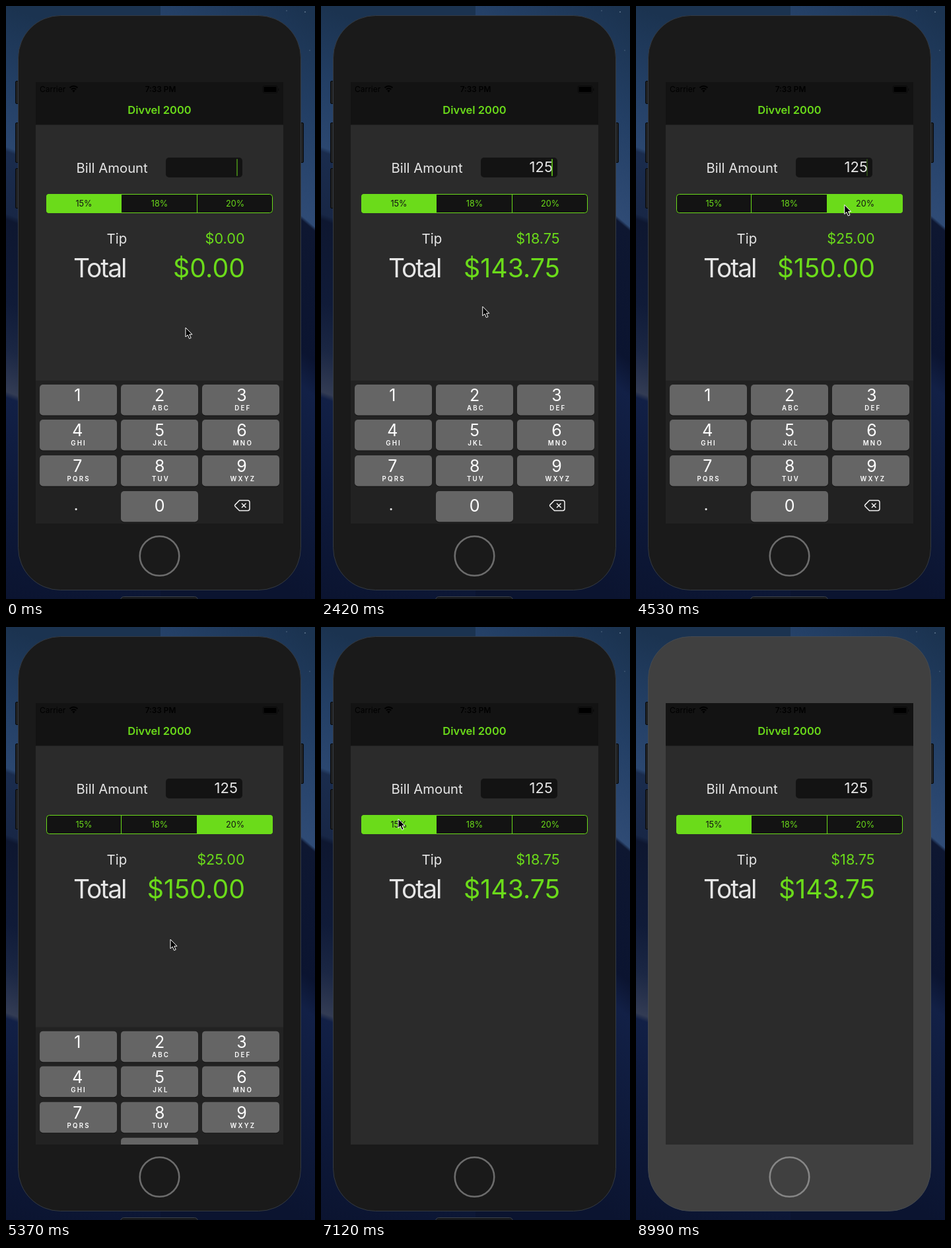
An HTML page for the animation above (9.09 s loop, 468 px wide and 896 px high).

```html
<!DOCTYPE html>
<html lang="en">
<head>
<meta charset="utf-8">
<title>Tip calculator</title>
<style>
  html, body { margin: 0; width: 100%; height: 100%; overflow: hidden; background: #0b1530; }
  svg { display: block; width: 100vw; height: 100vh; }
  text { font-family: Inter, Roboto, sans-serif; fill: #e6e6e6; white-space: pre; }
  .green { fill: #6bdb1a; }
  .end { text-anchor: end; }
  .mid { text-anchor: middle; }
</style>
</head>
<body>
<svg viewBox="0 0 468 896" preserveAspectRatio="none">
  <defs>
    <linearGradient id="skyLeft" gradientUnits="userSpaceOnUse" x1="0" y1="0" x2="0" y2="896" gradientTransform="skewY(20)">
      <stop offset="0" stop-color="#1b3350"/>
      <stop offset=".13" stop-color="#233f65"/>
      <stop offset=".237" stop-color="#2b4770"/>
      <stop offset=".245" stop-color="#1a2c4d"/>
      <stop offset=".35" stop-color="#182746"/>
      <stop offset=".36" stop-color="#0e1730"/>
      <stop offset=".5" stop-color="#101b38"/>
      <stop offset=".58" stop-color="#1b2744"/>
      <stop offset=".65" stop-color="#333c54"/>
      <stop offset=".66" stop-color="#122046"/>
      <stop offset=".8" stop-color="#0e1a3c"/>
      <stop offset="1" stop-color="#0b1430"/>
    </linearGradient>
    <linearGradient id="skyRight" gradientUnits="userSpaceOnUse" x1="0" y1="0" x2="0" y2="896" gradientTransform="translate(447 0) skewY(40)">
      <stop offset="0" stop-color="#1b3350"/>
      <stop offset=".18" stop-color="#233f65"/>
      <stop offset=".353" stop-color="#2f4b75"/>
      <stop offset=".36" stop-color="#0e1731"/>
      <stop offset=".58" stop-color="#0b1430"/>
      <stop offset=".64" stop-color="#122046"/>
      <stop offset="1" stop-color="#0b1430"/>
    </linearGradient>
    <clipPath id="screenClip"><rect x="45" y="115" width="375" height="667"/></clipPath>
    <clipPath id="segmentClip"><rect x="61" y="284" width="343" height="29" rx="4"/></clipPath>
  </defs>

  <rect width="234" height="896" fill="url(#skyLeft)"/>
  <rect x="234" width="234" height="896" fill="url(#skyRight)"/>
  <g fill="#8ea3b8"><circle cx="453" cy="9" r=".8"/><circle cx="425" cy="7" r=".6"/><circle cx="460" cy="67" r=".5"/></g>

  <g fill="#202122" stroke="#08090b">
    <rect x="14.500" y="113.500" width="8" height="34" rx="1.500"/>
    <rect x="14.500" y="176.500" width="8" height="60" rx="1.500"/>
    <rect x="14.500" y="245.500" width="8" height="60" rx="1.500"/>
    <rect x="442.500" y="176.500" width="8" height="60" rx="1.500"/>
  </g>
  <rect id="dock" x="173.500" y="892.500" width="117" height="20" rx="5" fill="#17191d" stroke="#3b4149"/>
  <rect id="body" x="18.500" y="14.500" width="428" height="868" rx="64"/>
  <circle id="home" cx="232.500" cy="831" r="29.800" fill="none" stroke-width="2.600"/>

  <rect x="45" y="115" width="375" height="667" fill="#2b2b2b"/>
  <rect x="45" y="115" width="375" height="64.500" fill="#131313"/>
  <text x="51" y="129.500" font-size="12" style="fill:#000">Carrier</text>
  <text class="mid" x="234" y="129.500" font-size="11.800" font-weight="600" style="fill:#000">7:33 PM</text>
  <g fill="none" stroke="#000" stroke-width="2">
    <path d="M96.500 123.500Q102.500 118.500 108.500 123.500M98.800 126Q102.500 123 106.200 126"/>
    <path d="M102.500 130.500l-2.300-2.800q2.300-1.600 4.600 0z" fill="#000" stroke="none"/>
    <rect x="390.500" y="122" width="19" height="8" rx="1" fill="#000" stroke="none"/>
    <rect x="389" y="120.500" width="22" height="11" rx="2.500" stroke-width=".8" opacity=".5"/>
    <path d="M412.800 124.500v3.500" stroke-width="1.200" opacity=".5"/>
  </g>
  <text class="mid green" x="232.500" y="163" font-size="16.500" font-weight="600">Divvel 2000</text>

  <text x="106.500" y="252" font-size="20.300">Bill Amount</text>
  <rect x="242" y="229" width="116" height="30" rx="5" fill="#131313"/>
  <text id="bill" class="end" x="351" y="251" font-size="22"></text>
  <rect id="caret" class="green" x="349" y="231" width="2" height="26" rx=".8"/>

  <g clip-path="url(#segmentClip)">
    <rect x="61" y="284" width="343" height="29" fill="#131313"/>
    <rect id="selected" class="green" y="284" width="115" height="29"/>
  </g>
  <g fill="none" stroke="#6bdb1a">
    <rect x="61.500" y="284.500" width="342" height="28" rx="4"/>
    <path d="M174.500 284v29M289.500 284v29"/>
  </g>
  <g id="rates"></g>

  <text x="152.500" y="358.500" font-size="20.500">Tip</text>
  <text id="tip" class="end green" x="361.700" y="358.500" font-size="21.700"></text>
  <text x="102" y="410" font-size="39" letter-spacing="-2.100">Total</text>
  <text id="total" class="end green" x="362" y="410" font-size="39.300"></text>

  <g clip-path="url(#screenClip)"><g id="keyboard">
    <rect x="45" y="566" width="375" height="217" fill="#222"/>
    <g id="keys"></g>
    <text class="mid" x="106" y="762" font-size="25">.</text>
    <path d="M353.500 747H366q3 0 3 3v9.500q0 3-3 3H353.500L347 756q-1-1.200 0-2.400zM357 751.500l6.500 6.500m0-6.500l-6.500 6.500" fill="none" stroke="#f2f2f2" stroke-width="1.500" stroke-linejoin="round"/>
  </g></g>

  <path id="cursor" d="M0 0V14L3.200 11L5.600 16.600L8.200 15.500L5.800 10.200H10Z" fill="#000" stroke="#fff"/>
</svg>

<script>
const LOOP = 9090;
const $ = id => document.getElementById(id);

// [time, value] steps: the last one reached applies
const billSteps = [[0, ''], [760, '1'], [1370, '12'], [1780, '125']];
const rateSteps = [[0, 0], [3130, 1], [4030, 2], [7030, 0]];
const pressSteps = [[0, 0], [670, 1], [1070, 0], [1270, 2], [1550, 0], [1690, 5], [2080, 0]];
const rates = [15, 18, 20];
const segments = [60, 175, 289.5];

// [time, x, y]
const cursorPath = [
  [80, 272, 486], [460, 116, 605], [1070, 116, 605], [1270, 226, 606], [1370, 243, 663],
  [2120, 243, 663], [2630, 246, 309], [2920, 243, 300], [3250, 243, 300], [3510, 327, 300],
  [3620, 335, 300], [4440, 335, 300], [4530, 316, 300], [4850, 238, 431], [5020, 249, 472],
  [5630, 249, 472], [5830, 235, 318], [5950, 235, 318], [6200, 222, 292], [6450, 198, 293],
  [6720, 117, 290], [7660, 117, 290], [8520, 440, 898]
];

const clamp = v => Math.min(1, Math.max(0, v));
const smooth = v => v * v * (3 - 2 * v);
const stepAt = (steps, t) => steps.filter(s => s[0] <= t).pop()[1];
const money = v => '$' + v.toFixed(2);

function pathAt(path, t) {
  const i = path.findIndex(p => p[0] > t);
  if (i === 0) return path[0].slice(1);
  if (i < 0) return path[path.length - 1].slice(1);
  const [t0, x0, y0] = path[i - 1], [t1, x1, y1] = path[i];
  const k = (t - t0) / (t1 - t0);
  return [x0 + (x1 - x0) * k, y0 + (y1 - y0) * k];
}

function caretOpacity(t) {
  if (t >= 5250) return 0;
  if (t >= 670 && t < 2080) return 1;
  const phase = (t < 670 ? t + 705 : t - 2770 + 1025) % 1025;
  return phase < 500 ? clamp((phase + 20) / 80) : clamp((765 - phase) / 120);
}

const letters = ['', 'ABC', 'DEF', 'GHI', 'JKL', 'MNO', 'PQRS', 'TUV', 'WXYZ'];

function keyMarkup(digit) {
  const slot = digit ? digit - 1 : 10;
  const column = slot % 3, row = Math.floor(slot / 3);
  const x = 51 + 123 * column, y = Math.floor(572 + 53.7 * row);
  const center = 108.3 + 124.4 * column;
  const label = digit ? letters[digit - 1] : '';
  return `<rect x="${x}" y="${y + 1}" width="117" height="46.5" rx="5" fill="#111"/>
    <rect id="key${digit}" x="${x}" y="${y}" width="117" height="46.5" rx="5"/>
    <text class="mid" x="${center}" y="${y + (digit ? 25 : 31)}" font-size="25" style="fill:#fff">${digit}</text>
    <text class="mid" x="${center + 1.8}" y="${y + 39}" font-size="9.7" font-weight="600" letter-spacing="2.2" style="fill:#fff">${label}</text>`;
}

const digits = [1, 2, 3, 4, 5, 6, 7, 8, 9, 0];
$('keys').innerHTML = digits.map(keyMarkup).join('');
$('rates').innerHTML = rates.map((r, i) =>
  `<text class="mid" x="${118 + 114.6 * i}" y="303" font-size="12.7">${r}%</text>`).join('');

function draw(t) {
  const bill = stepAt(billSteps, t), choice = stepAt(rateSteps, t), pressed = stepAt(pressSteps, t);
  const tip = bill * rates[choice] / 100;
  $('bill').textContent = bill;
  $('tip').textContent = money(tip);
  $('total').textContent = money(+bill + tip);
  $('caret').setAttribute('opacity', caretOpacity(t));

  $('selected').setAttribute('x', segments[choice]);
  [...$('rates').children].forEach((label, i) => {
    label.style.fill = i === choice ? '#131313' : '#6bdb1a';
  });
  digits.forEach(d => $('key' + d).setAttribute('fill', d && d === pressed ? '#3b3b3b' : '#656565'));
  const slide = 217 * smooth(clamp((t - 5250) / 450));
  $('keyboard').setAttribute('transform', `translate(0 ${slide})`);

  $('cursor').setAttribute('transform', `translate(${pathAt(cursorPath, t)})`);

  const inactive = t >= 8990;
  $('body').setAttribute('fill', inactive ? '#404040' : '#1a1a1a');
  $('body').setAttribute('stroke', inactive ? '#454a50' : '#343a42');
  $('home').setAttribute('stroke', inactive ? '#868686' : '#6c6c6c');
  $('dock').setAttribute('visibility', inactive ? 'hidden' : 'visible');
}

const start = performance.now();
function tick() {
  draw((performance.now() - start) % LOOP);
  requestAnimationFrame(tick);
}
tick();
</script>
</body>
</html>
```
